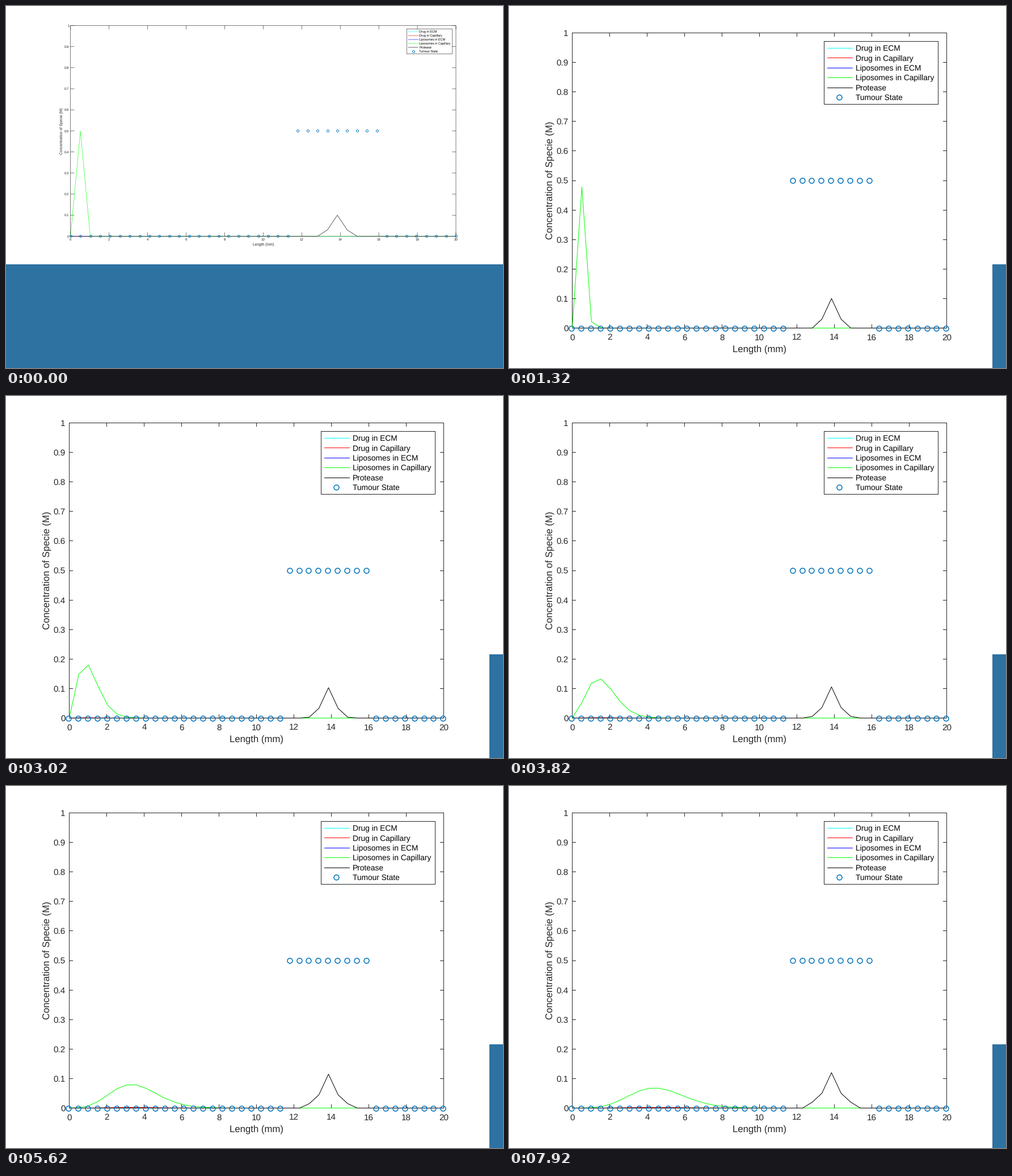
Animation, 876 px wide and 639 px high, one loop 8 s. Source, as a matplotlib script:

```python
import math

import matplotlib.pyplot as plt
import numpy as np
from matplotlib.animation import FuncAnimation
from matplotlib.patches import Rectangle

W, H, DPI = 876, 639, 96
FRAMES, INTERVAL = 80, 100
PT = 72 / DPI  # points per pixel

DESKTOP, DESKTOP_TOP = "#2e72a1", 456
AXIS, MARK = "#262626", "#0072bd"
SERIES = {
    "Drug in ECM": "#00ffff",
    "Drug in Capillary": "#ff0000",
    "Liposomes in ECM": "#0000ff",
    "Liposomes in Capillary": "#00ff00",
    "Protease": "#000000",
}
TUMOUR = "Tumour State"

CELLS = np.arange(40)
LENGTH = 20 * CELLS / 39
TUMOUR_STATE = np.where((CELLS >= 23) & (CELLS <= 31), 0.5, 0)
FACTORIAL = np.array([float(math.factorial(k)) for k in range(39)])

# (frame, travelled cells, cells per frame)
PACE = [(22, 0.41, 0.09), (38, 2.24, 0.15), (49, 4.43, 0.21),
        (63, 7.3, 0.15), (79, 8.05, 0.03)]

plt.rcParams.update({"font.family": "Liberation Sans", "text.hinting": "none",
                     "path.snap": False, "path.simplify": False})


def travelled(frame):
    """Flow time: exponential start-up, then a cubic through PACE."""
    if frame < PACE[0][0]:
        return PACE[0][1] * math.exp(0.245 * (frame - PACE[0][0]))
    for (a, ya, va), (b, yb, vb) in zip(PACE, PACE[1:]):
        if frame <= b:
            break
    s, span = (frame - a) / (b - a), b - a
    return ((2 * s**3 - 3 * s**2 + 1) * ya + (s**3 - 2 * s**2 + s) * span * va
            + (3 * s**2 - 2 * s**3) * yb + (s**3 - s**2) * span * vb)


def concentrations(t):
    """Upwind advection of a pulse, leaking slowly into the other species."""
    liposomes = np.zeros(40)
    liposomes[1:] = 0.5 * np.exp(-1.0043 * t) * t ** np.arange(39) / FACTORIAL
    protease = np.zeros(40)
    protease[25:30] = np.array([0, 0.03, 0.1, 0.03, 0]) + 0.0025 * t
    return {
        "Drug in ECM": np.zeros(40),
        "Drug in Capillary": 0.004 * t * liposomes,
        "Liposomes in ECM": 0.0003 * t * liposomes,
        "Liposomes in Capillary": liposomes,
        "Protease": protease,
    }


class Chart:
    def __init__(self, ax, box, fonts, stroke, ring, tick, xlab_y, ylab_x,
                 xtick_y, ytick_x, legend, crisp):
        self.ax, self.box, self.stroke, self.ring = ax, box, stroke, ring
        self.crisp = crisp
        self.artists = []
        left, top, right, bottom = box
        tick_size, label_size, legend_size = fonts

        self.line([left, right, right, left, left],
                  [top, top, bottom, bottom, top], AXIS)
        for v in range(0, 21, 2):
            x = self.grid(self.px(v))
            self.line([x, x], [bottom, bottom - tick], AXIS)
            self.line([x, x], [top, top + tick], AXIS)
            self.text(x, xtick_y, str(v), tick_size, "center", AXIS)
        for i in range(11):
            y = self.py(i / 10)
            row = self.grid(y)
            self.line([left, left + tick], [row, row], AXIS)
            self.line([right, right - tick], [row, row], AXIS)
            self.text(ytick_x, y + 0.35 * tick_size, f"{i / 10:g}",
                      tick_size, "right", AXIS)
        self.text((left + right) / 2, xlab_y, "Length (mm)",
                  label_size, "center", AXIS)
        self.text(ylab_x, (top + bottom) / 2, "Concentration of Specie (M)",
                  label_size, "center", AXIS, 90)

        self.curves = {name: self.line(self.px(LENGTH), 0 * LENGTH, color)
                       for name, color in SERIES.items()}
        self.circles(self.px(LENGTH), self.py(TUMOUR_STATE))
        self.draw_legend(legend_size, **legend)

    def px(self, v):
        left, _, right, _ = self.box
        return left + (right - left) * v / 20

    def py(self, v):
        _, top, _, bottom = self.box
        return bottom - (bottom - top) * v

    def grid(self, v):
        """Centre of the pixel holding v, when the chart is drawn crisp."""
        return math.floor(v) + 0.5 if self.crisp else v

    def line(self, x, y, color):
        artist, = self.ax.plot(x, y, color=color, lw=self.stroke * PT,
                               solid_capstyle="butt", snap=False)
        self.artists.append(artist)
        return artist

    def circles(self, x, y):
        size, edge, shift = self.ring
        artist, = self.ax.plot(x + shift, y, "o", ms=size * PT, mfc="none",
                               mec=MARK, mew=edge * PT, snap=False)
        self.artists.append(artist)

    def text(self, x, y, label, size, align, color, angle=0):
        self.artists.append(self.ax.text(
            x, y, label, size=size * PT, ha=align, va="baseline", color=color,
            rotation=angle, rotation_mode="anchor"))

    def draw_legend(self, size, frame, first, step, sample, text_x):
        x0, y0, x1, y1 = frame
        self.line([x0, x1, x1, x0, x0], [y0, y0, y1, y1, y0], AXIS)
        for i, name in enumerate([*SERIES, TUMOUR]):
            y = first + i * step
            if name == TUMOUR:
                self.circles(np.array([sum(sample) / 2]), np.array([y]))
            else:
                row = self.grid(y)
                self.line(sample, [row, row], SERIES[name])
            self.text(text_x, y + 0.35 * size, name, size, "left", "black")

    def show(self, visible):
        for artist in self.artists:
            artist.set_visible(visible)

    def set_time(self, t):
        for name, values in concentrations(t).items():
            self.curves[name].set_ydata(self.py(values))


fig = plt.figure(figsize=(W / DPI, H / DPI), dpi=DPI, facecolor="white")
ax = fig.add_axes([0, 0, 1, 1])
ax.axis("off")
desktop = ax.add_patch(Rectangle((0, DESKTOP_TOP), W, H - DESKTOP_TOP,
                                 fc=DESKTOP, lw=0))

wide = Chart(
    ax, box=(113.7, 34.5, 793, 406.4), fonts=(6.1, 6.6, 5.55), stroke=0.6,
    ring=(4, 0.9, 0), tick=6.8, xlab_y=422.9, ylab_x=100, xtick_y=414.3,
    ytick_x=111.5, crisp=False,
    legend=dict(frame=(706.3, 40.5, 786.8, 84.4), first=45.2, step=6.95,
                sample=(708.8, 726.6), text_x=728.3))
large = Chart(
    ax, box=(111.5, 47.5, 771.5, 568.5), fonts=(15.2, 16.75, 13.8), stroke=1,
    ring=(9, 1.5, -1.1), tick=6.6, xlab_y=610.6, ylab_x=76, xtick_y=589.4,
    ytick_x=104.7, crisp=True,
    legend=dict(frame=(555.5, 62.5, 756.5, 173.5), first=74.5, step=17.38,
                sample=(561, 606), text_x=611))

ax.set_xlim(0, W)
ax.set_ylim(H, 0)


def update(frame):
    opening = frame == 0
    desktop.set_x(0 if opening else 852)
    wide.show(opening)
    large.show(not opening)
    (wide if opening else large).set_time(0 if opening else travelled(frame))
    return [desktop, *wide.artists, *large.artists]


anim = FuncAnimation(fig, update, frames=FRAMES, interval=INTERVAL,
                     init_func=lambda: update(0), repeat=True, repeat_delay=0)
plt.show()
```
